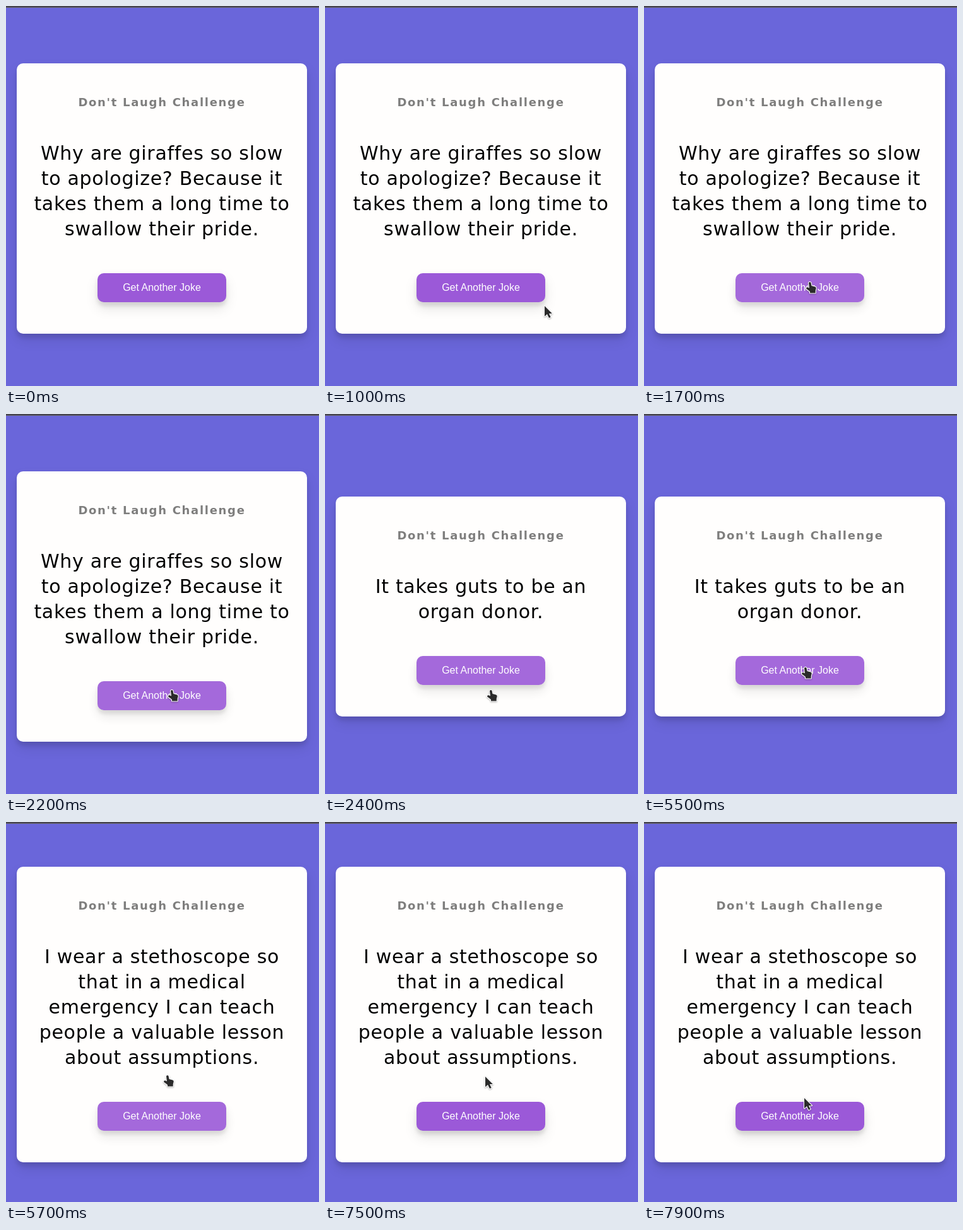
An HTML page that plays this animation: 496 by 603 pixels, repeating every 8000 ms.

```html
<!DOCTYPE html>
<html lang="en">
<head>
<meta charset="utf-8">
<title>Don't Laugh Challenge</title>
<style>
  * { box-sizing: border-box; margin: 0; }
  html, body { width: 100%; height: 100%; overflow: hidden; }
  body {
    position: relative;
    background: #6a66da;
    font-family: "DejaVu Sans", Inter, sans-serif;
    text-align: center;
  }
  .edge {
    position: absolute;
    inset: 0 0 auto;
    height: 3px;
    background: #45434d;
    border-bottom: 1px solid #6b697c;
  }
  .card {
    position: absolute;
    left: 17px;
    width: 460px;
    border-radius: 10px;
    background: #fffefd;
    box-shadow: 0 10px 20px rgba(0,0,0,.1), 0 6px 6px rgba(0,0,0,.1);
  }
  h3 {
    position: absolute;
    top: 50px;
    width: 100%;
    font-size: 18px;
    line-height: 23px;
    letter-spacing: 1.7px;
    color: #000;
    opacity: .5;
  }
  p {
    position: absolute;
    top: 123px;
    width: 100%;
    font-size: 30px;
    line-height: 40px;
    letter-spacing: .7px;
    white-space: pre;
    color: #000;
  }
  .btn {
    position: absolute;
    left: 128px;
    bottom: 50px;
    width: 204px;
    height: 46px;
    border-radius: 10px;
    background: #9b59d8;
    color: #fff;
    font: 16px/46px "Liberation Sans", Arial, sans-serif;
    box-shadow: 0 10px 20px rgba(0,0,0,.1), 0 6px 6px rgba(0,0,0,.1);
  }
  svg { position: absolute; left: 0; top: 0; overflow: visible; }
  path { fill: #2b2b2b; stroke: #fff; stroke-width: 2.2; stroke-linejoin: round; paint-order: stroke; }
  #cursor { filter: drop-shadow(0 1px 1px rgba(0,0,0,.3)); }
</style>
</head>
<body>
<div class="edge"></div>
<div class="card" id="card">
  <h3>Don't Laugh Challenge</h3>
  <p id="joke"></p>
  <div class="btn" id="btn">Get Another Joke</div>
</div>
<svg width="496" height="603">
  <g id="cursor">
    <path id="arrow" d="M0 0V16.5L4 13L7 19L9.7 17.8L7 12H12Z"/>
    <path id="hand" d="M-2 1.5Q-.5 -1 1.5 1L2.5 6L8 7.5Q10 8 9.7 10L8.7 14V17.5H0V15L-6 10.5Q-6 7.5 -3 8.5L-1 9.5Z"/>
  </g>
</svg>
<script>
const LOOP = 8000, STEP = 100;
const $ = id => document.getElementById(id);
const card = $('card'), joke = $('joke'), btn = $('btn');

const jokes = [
  [0, 'Why are giraffes so slow\nto apologize? Because it\ntakes them a long time to\nswallow their pride.'],
  [2400, 'It takes guts to be an\norgan donor.'],
  [5700, 'I wear a stethoscope so\nthat in a medical\nemergency I can teach\npeople a valuable lesson\nabout assumptions.']
];
// time, x, y of the pointer tip
const moves = [
  [700, 420, 500], [1200, 300, 460], [1500, 267, 441], [1700, 263, 438],
  [4300, 263, 438], [4400, 259, 433], [4700, 257, 404], [4800, 257, 404],
  [4900, 256, 402], [7400, 256, 402], [7500, 254, 404], [7900, 254, 438]
];
const hovers = [[1200, 4400], [4600, 7500]];
const presses = [[2000, 2200], [5300, 5500]];

const within = (t, spans) => spans.some(([a, b]) => t >= a && t < b);

function pointerAt(t) {
  const i = moves.findIndex(m => m[0] > t);
  if (i < 0) return moves[moves.length - 1].slice(1);
  const [t0, x0, y0] = moves[Math.max(0, i - 1)], [t1, x1, y1] = moves[i];
  const k = t1 === t0 ? 0 : Math.max(0, (t - t0) / (t1 - t0));
  return [x0 + (x1 - x0) * k, y0 + (y1 - y0) * k];
}

function render(time) {
  const t = Math.floor(time % LOOP / STEP) * STEP;
  const text = jokes.filter(j => j[0] <= t).pop()[1];
  const textHeight = 40 * text.split('\n').length;
  if (joke.textContent !== text) joke.textContent = text;
  card.style.top = 171 - textHeight / 2 + 'px';
  card.style.height = 269 + textHeight + 'px';

  const hover = within(t, hovers);
  btn.style.opacity = hover ? .9 : 1;
  btn.style.transform = within(t, presses) ? 'scale(.98)' : 'none';

  const [x, y] = pointerAt(t);
  $('cursor').setAttribute('transform', `translate(${x} ${y})`);
  $('cursor').style.display = t < moves[0][0] ? 'none' : '';
  $('hand').style.display = hover ? '' : 'none';
  $('arrow').style.display = hover ? 'none' : '';
}

const start = performance.now();
function tick() {
  render(performance.now() - start);
  requestAnimationFrame(tick);
}
tick();
</script>
</body>
</html>
```
